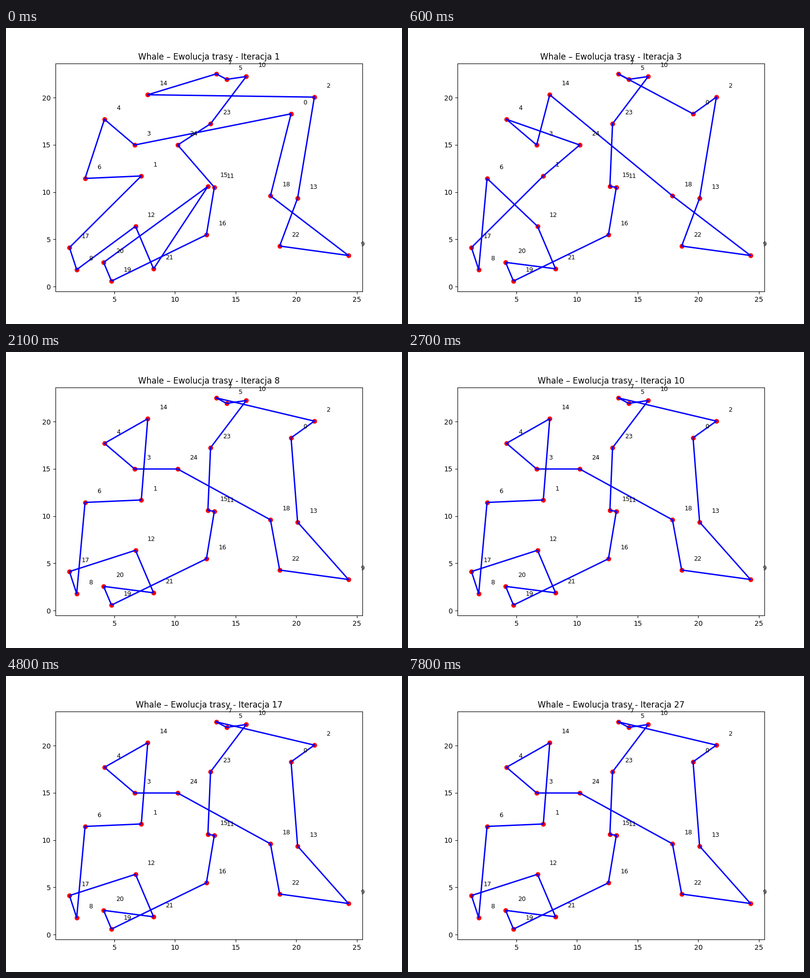
A matplotlib script that plays this animation: 800 by 600 pixels, repeating every 8 s.

```python
import matplotlib.pyplot as plt
from matplotlib.animation import FuncAnimation

STEP_MS = 100
LOOP_MS = 8000
ITERATION_MS = 300

# City positions; their order here is the first closed route.
CITIES = {
    7: (13.40, 22.52), 5: (14.26, 21.94), 10: (15.87, 22.24),
    23: (12.93, 17.24), 24: (10.22, 14.99), 11: (13.24, 10.51),
    16: (12.59, 5.48), 19: (4.76, 0.58), 20: (4.11, 2.56),
    15: (12.71, 10.60), 21: (8.23, 1.88), 12: (6.74, 6.38),
    8: (1.89, 1.79), 17: (1.293, 4.13), 1: (7.22, 11.71),
    6: (2.58, 11.45), 4: (4.18, 17.71), 3: (6.67, 14.99),
    0: (19.57, 18.29), 18: (17.87, 9.61), 9: (24.303, 3.29),
    22: (18.63, 4.29), 13: (20.11, 9.36), 2: (21.49, 20.06),
    14: (7.75, 20.31),
}

# City swaps that improve the route, by iteration.
SWAPS = {
    2: [(0, 14), (15, 24), (24, 6), (6, 21), (6, 12)],
    4: [(14, 24), (9, 22), (2, 0)],
    7: [(6, 17)],
}


def best_route(iteration):
    route = list(CITIES)
    for found, swaps in SWAPS.items():
        if found <= iteration:
            for a, b in swaps:
                i, j = route.index(a), route.index(b)
                route[i], route[j] = b, a
    return route


def route_xy(iteration):
    route = best_route(iteration)
    return zip(*(CITIES[city] for city in route + route[:1]))


fig, ax = plt.subplots(figsize=(8, 6), dpi=100)
ax.scatter(*zip(*CITIES.values()), c="red")
route_line, = ax.plot(*route_xy(1), color="blue", linewidth=2)
for city, (x, y) in CITIES.items():
    ax.text(x + 1, y + 1, str(city), fontsize=9)
title = ax.set_title("")


def update(frame):
    iteration = frame * STEP_MS // ITERATION_MS + 1
    route_line.set_data(*route_xy(iteration))
    title.set_text(f"Whale – Ewolucja trasy - Iteracja {iteration}")
    return route_line, title


anim = FuncAnimation(fig, update, frames=LOOP_MS // STEP_MS,
                     interval=STEP_MS, repeat=True)
plt.show()
```
